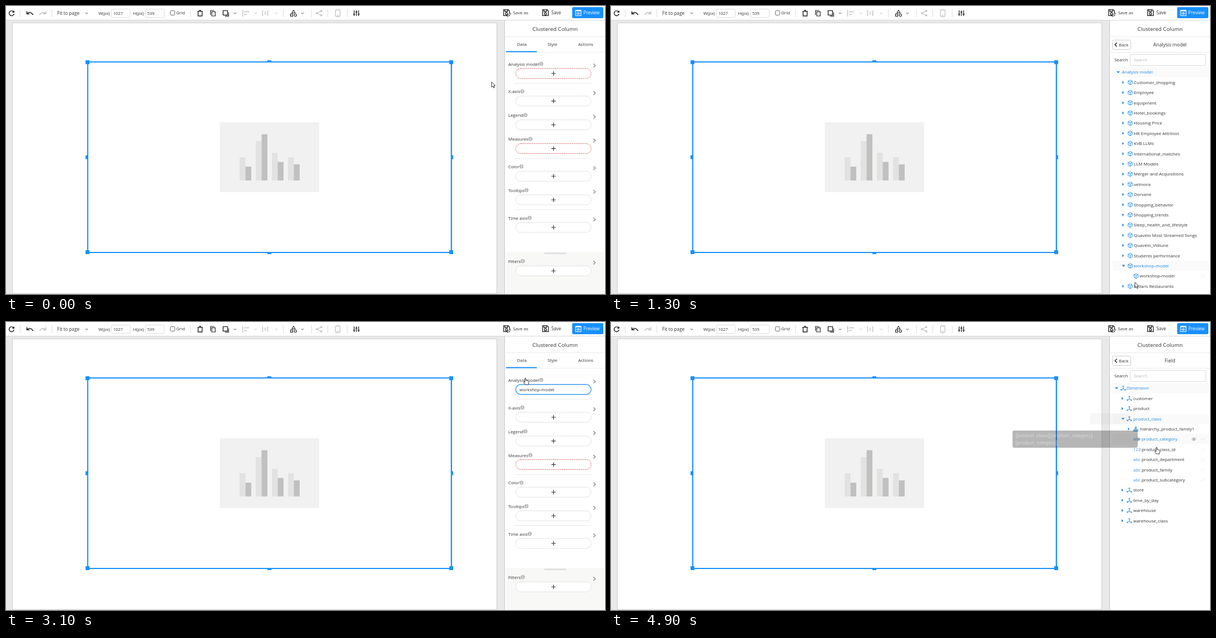
An HTML page with a canvas that plays this animation: 1077 by 520 pixels, repeating every 5 s.

```html
<!DOCTYPE html>
<html lang="en">
<head>
<meta charset="utf-8">
<title>Report designer</title>
<style>
html, body { margin: 0; width: 1077px; height: 520px; overflow: hidden; background: #fff; }
canvas { display: block; width: 1077px; height: 520px; }
</style>
</head>
<body>
<canvas id="stage" width="1077" height="520"></canvas>
<script>
const ctx = document.getElementById("stage").getContext("2d");
const UI = '"Open Sans", "Noto Sans", sans-serif';
const TIP = '"Liberation Sans", Arial, sans-serif';
const BLUE = "#1890ff", LINK = "#1c86dd", INK = "#333", PALE = "#bfbfbf";
const LOOP = 5000, STEP = 50;

const clamp = v => Math.max(0, Math.min(1, v));
const ramp = (t, a, b) => clamp((t - a) / (b - a));
const pulse = (t, a, b, c, d) => Math.min(ramp(t, a, b), 1 - ramp(t, c, d));

// Fonts are laid out ten times larger so that small sizes keep exact spacing.
function setFont(size, family, weight) {
  ctx.font = `${weight} ${size * 10}px ${family}`;
}
function textWidth(s, size = 7.95, family = UI, weight = 400) {
  setFont(size, family, weight);
  return ctx.measureText(s).width / 10;
}
function text(s, x, y, color = INK, size = 7.95, align = "left", family = UI, weight = 400) {
  ctx.save();
  ctx.translate(x, y + size * 0.36);
  ctx.scale(0.1, 0.1);
  setFont(size, family, weight);
  ctx.textAlign = align;
  ctx.fillStyle = color;
  ctx.fillText(s, 0, 0);
  ctx.restore();
}
function rect(x, y, w, h, color) {
  ctx.fillStyle = color;
  ctx.fillRect(x, y, w, h);
}
function box(x, y, w, h, r, fill, line, width = 1, dash = []) {
  ctx.beginPath();
  ctx.roundRect(x, y, w, h, r);
  if (fill) { ctx.fillStyle = fill; ctx.fill(); }
  if (line) {
    ctx.strokeStyle = line;
    ctx.lineWidth = width;
    ctx.setLineDash(dash);
    ctx.stroke();
    ctx.setLineDash([]);
  }
}
function icon(d, x, y, line, width = 1, fill) {
  const p = new Path2D(d);
  ctx.save();
  ctx.translate(x, y);
  ctx.lineJoin = "round";
  if (fill) { ctx.fillStyle = fill; ctx.fill(p); }
  if (line) { ctx.strokeStyle = line; ctx.lineWidth = width; ctx.stroke(p); }
  ctx.restore();
}
function dot(x, y, r, color) {
  ctx.beginPath();
  ctx.arc(x, y, r, 0, 7);
  ctx.fillStyle = color;
  ctx.fill();
}

const CHECK = "M-3.6 0L-1.2 2.4L3.8 -2.4";
const DOWN = "M-2.2 -1L0 1.2L2.2 -1";
const RELOAD = "M3.6 -2.6A4.4 4.4 0 1 0 4.4 1M4.4 -4.6V-1.6H1.4";
const CUBE = "M0 -4.2L3.7 -2.3V2.2L0 4.2L-3.7 2.2V-2.3ZM-3.7 -2.3L0 -.4L3.7 -2.3M0 -.4V4.2";
const AXES = "M0 1V-4M-1.4 -2.7L0 -4.3L1.4 -2.7M0 1L-4 3.4M-4.2 1.6V3.6H-2.2M0 1L4 3.4M4.2 1.6V3.6H2.2";
const TREE = "M0 -1V1M-3 2V.2H3V2M0 0V2M-1.2 -4H1.2V-1.6H-1.2ZM-4.2 2H-1.9V4.2H-4.2ZM-1.1 2H1.1V4.2H-1.1ZM1.9 2H4.2V4.2H1.9Z";
const DISK = "M-5.3 -5.3H3L5.3 -3V5.3H-5.3ZM-3 -5V-2H2V-5M-2 2A2 2 0 1 0 2 2A2 2 0 1 0 -2 2";
const ARROW = "M0 0V9.6L2.2 7.5L3.8 10.9L5.4 10.2L3.9 6.9H6.8Z";
const HAND = "M-1 1Q0 -.6 1 1V4.6L2.4 4.6L3.8 5L5.2 5.6Q6.2 6.1 6 8L5 12.2H0L-3 8.6Q-3.7 7 -2.2 6.9L-1 8Z";

function field(label, value, lx, x, w) {
  text(label, lx, 13);
  box(x + .5, 5.5, w, 15, 2, "#fff", "#ddd");
  text(value, x + 4, 13, INK, 7.5);
}

function toolbar() {
  rect(0, 0, 1077, 25, "#fff");
  rect(0, 25, 1077, 1, "#d6d6d6");
  for (const x of [25, 82, 331, 498, 549, 578, 613]) rect(x, 6, 1, 14, "#ddd");
  icon(RELOAD, 10, 13, "#222", 1.4);
  const undo = "M-5.5 -3.5V1.2H-.8M-5 .8Q0 -4.8 5.8 3";
  icon(undo, 43, 13, "#222", 1.6);
  icon("M5.5 -3.5V1.2H.8M5 .8Q0 -4.8 -5.8 3", 66, 13, PALE, 1.5);
  text("Fit to page", 92, 13, INK, 8.2);
  icon(DOWN, 145, 13, "#444");
  field("W(px)", "1027", 166, 189, 34);
  field("H(px)", "539", 228.5, 250, 34);
  box(295.5, 8.5, 8, 8, 2, "#fff", "#666");
  text("Grid", 306, 12.5);
  icon("M-3.6 -3V5H3.6V-3M-4.8 -3.4H4.8M-2 -5H2", 349, 13, "#222", 1.4);
  icon("M-2 -2.6H4.2V5H-2ZM-4.3 3V-5H2.4", 372, 13, "#222", 1.2);
  icon("M-4.6 -4.6H3.4V3.4H-4.6Z", 395, 13, "#222", 1.4);
  icon("M5.4 -1.5V5.4H-1.5", 395, 13, "#222", 1.1);
  icon(DOWN, 412, 13, "#444");
  icon("M-5.5 -6V6M-3 -2.5H6M-3 2.5H2", 431, 13, PALE, 1.4);
  icon(DOWN, 449, 13, PALE);
  icon("M-4.6 -5V5M4.6 -5V5M0 -3V3", 466, 13, PALE, 1.4);
  icon(DOWN, 486, 13, PALE);
  icon("M0 -5.5L3 -.5H-3ZM-5.4 1.4H-1.4V5.4H-5.4ZM1.2 3.4A2.1 2.1 0 1 0 5.4 3.4A2.1 2.1 0 1 0 1.2 3.4", 517, 13, "#222", 1.1);
  icon(DOWN, 533, 13, "#444");
  icon("M4 -4L-4 0L4 4", 563, 13, PALE, 1.1);
  dot(567, 9, 1.8, PALE); dot(559, 13, 1.8, PALE); dot(567, 17, 1.8, PALE);
  box(592.5, 7, 8, 12, 1.5, null, PALE, 1.3);
  rect(595, 16, 3, 1, PALE);
  icon("M-4 -5V5M0 -5V5M4 -5V5M-5.8 1.8H-2.2M-1.8 -1.8H1.8M2.2 1.8H5.8", 630, 13, "#222", 1.3);
  icon(DISK, 900, 12, "#222", 1.3);
  icon("M0 6L5.6 .6L7 2L1.6 7H0Z", 901, 12, "#222", .8, "#fff");
  text("Save as", 911.5, 12.5);
  icon(DISK, 970, 12, "#222", 1.3);
  text("Save", 980.5, 12.5, INK, 8.1);
  box(1018, 2, 56, 20, 2, BLUE);
  box(1024, 7.5, 10, 10, 1, null, "#fff", 1.1);
  rect(1024, 7.5, 10, 2, "#fff");
  icon("M-3.3 1Q0 -2.6 3.3 1Q0 4.4 -3.3 1", 1029, 12.5, "#fff", .9);
  dot(1029, 13.5, 1, "#fff");
  text("Preview", 1038, 12.5, "#fff", 8.1);
}

function canvasArea() {
  rect(0, 26, 897, 494, "#e9e9e9");
  box(11.5, 30.5, 871, 488.5, 0, "#fff", "#cfcfcf");
  rect(384.5, 210, 178.5, 126, "#f1f1f1");
  [[273, 290], [244, 231.5], [265, 281.5], [273, 286]].forEach(([a, b], i) => {
    const x = 420 + 29 * i;
    rect(x, a, 10.5, 315 - a, "#e2e2e1");
    rect(x + 10.5, b, 10.5, 315 - b, "#c0c0c0");
  });
  rect(146, 100, 656, 2, BLUE);
  rect(146, 444, 656, 2, BLUE);
  rect(146, 100, 2, 346, BLUE);
  rect(799.7, 100, 2.3, 346, BLUE);
  for (const x of [143, 797]) for (const y of [98, 441]) rect(x, y, 7, 7, BLUE);
  rect(470, 98, 7, 4, BLUE);
  rect(470, 444, 7, 4, BLUE);
  rect(143, 269.5, 4, 7, BLUE);
  rect(800, 269.5, 4, 7, BLUE);
}

function section(label, y, pillY, style, value) {
  text(label, 903, y);
  const ix = 903 + textWidth(label) + 3.8;
  dot(ix, y - .5, 3.7, "#bdbdbd");
  rect(ix - .5, y - 1, 1, 2.6, "#fff");
  rect(ix - .5, y - 2.8, 1, 1, "#fff");
  icon("M-1.8 -3.2L1.6 0L-1.8 3.2", 1058, y + 2.5, "#999", 1.7);
  const line = { need: "#cc4444", set: "#3b9af0", hover: BLUE }[style] || "#c9c9c9";
  const solid = style === "set";
  box(916.5, pillY - 9, 135.5, 18, 9, "#fff", line, solid ? 1.5 : .9, solid ? [] : [2, 1.4]);
  if (value) text(value, 923, pillY);
  else icon("M-4 0H4M0 -4V4", 984.5, pillY, "#333", 1.1);
}

function dataPanel(t) {
  const filled = t >= 2800, s = filled ? .4 : 0;
  const hoverX = t >= 3300 && t < 4050;
  text("Data", 927.5, 69, INK, 7.9, "center");
  text("Style", 982.5, 69, INK, 7.95, "center");
  text("Actions", 1042.3, 69, INK, 7.95, "center");
  rect(898, 83, 179, 1, "#eee");
  rect(899, 81.4, 55.5, 2, BLUE);
  section("Analysis model", 105, 121.8, filled ? "set" : t >= 450 ? "hover" : "need", filled && "workshop-model");
  section("X-axis", 154.6 + s, 171.6 + s, hoverX ? "hover" : "");
  section("Legend", 197.5 + s, 214.5 + s);
  section("Measures", 240.4 + s, 257.4, "need");
  section("Color", 290.2 + s, 307.3);
  section("Tooltips", 333, 350);
  section("Time axis", 383, 399.8);
  for (const y of [139, 275, 367]) rect(914, y, 140, 1, "#ebebeb");
  rect(899, 444, 177, 76, "#f8f8f7");
  rect(968, 445.5, 39, 2.5, "#dedede");
  section("Filters", 461, 478.2);
}

const rowY = i => 119.5 + 18.4 * i;
const band = i => rect(902, rowY(i) - 9, 173, 18, "#fafafa");
function expander(x, y, open) {
  icon(open ? "M-3 -1.5H3L0 1.8Z" : "M-1.4 -2.7L1.7 0L-1.4 2.7Z", x, y, null, 0, LINK);
}

function listHeader(title) {
  box(901.5, 61.5, 33, 17, 3, "#fff", "#ccc");
  icon("M1.6 -3.6L-1.8 0L1.6 3.6", 908, 70, "#222", 1.4);
  text("Back", 913, 70);
  text(title, 1005, 70, INK, 8.6, "center");
  rect(898, 83, 179, 1, "#eaeaea");
  text("Search", 905, 97, INK, 7.8);
  box(933.5, 87.5, 136, 20, 2, "#fff", "#d9d9d9");
  text("Search", 940, 97.5, "#b5b5b5", 7.7);
}

const MODELS = ["Customer_shopping", "Employee", "equipment", "Hotel_bookings", "Housing Price",
  "HR Employee Attrition", "KVB LLMs", "International_matches", "LLM Models",
  "Merger and Acquisitions", "velmora", "Dorvane", "Shopping_behavior", "Shopping_trends",
  "Sleep_health_and_lifestyle", "Quavelo Most Streamed Songs", "Quavelo_Vidlune",
  "Students performance", "workshop-model", ">workshop-model", "Pellaro Restaurants"];

function modelPanel(t) {
  const picked = t >= 1900;
  const hover = t >= 1250 && t < 1750 ? 19 : t >= 1750 && t < 2250 ? 20 : 0;
  listHeader("Analysis model");
  band(0);
  if (hover) band(hover);
  if (picked) { band(19); band(20); }
  expander(912, rowY(0), true);
  text("Analysis model", 918.5, rowY(0), LINK);
  if (t < 1150) icon("M4 -1.2A4 4 0 0 0 -3.6 -1.4M-4 1.2A4 4 0 0 0 3.6 1.4M-3.9 -4V-1.2H-1.2M3.9 4V1.2H1.2", 1064, rowY(0), "#3b9af0");
  MODELS.forEach((name, n) => {
    const i = n + 1, y = rowY(i), leaf = name[0] === ">", dx = leaf ? 10.5 : 0;
    if (!leaf) expander(dx + (i === 19 ? 921.5 : 920.8), y, i === 19);
    icon(CUBE, 933.5 + dx, y, LINK, .9);
    const on = i === hover || picked && (i === 19 || i === 20);
    text(leaf ? name.slice(1) : name, 940 + dx, y, on ? LINK : INK);
  });
  icon(CHECK, 1064.5, rowY(20), picked ? "#1677d8" : "#eee", picked ? 2 : 1);
  if (picked) {
    dot(936.5, 473.2, 3.4, "#2fae3f");
    icon("M-1.6 0L-.4 1.2L1.7 -1.1", 936.5, 473.2, "#fff", .9);
  }
}

const DIMENSIONS = ["customer", "product", "product_class", "store", "time_by_day", "warehouse", "warehouse_class"];
const FIELDS = ["abc product_category", "123 product_class_id", "abc product_department",
  "abc product_family", "abc product_subcategory"];

function fieldPanel(t) {
  const open = t >= 4200, hover = t >= 4700;
  listHeader("Field");
  band(0);
  band(3);
  if (hover) band(5);
  expander(909, rowY(0), true);
  icon(AXES, 921, rowY(0), LINK);
  text("Dimension", 927, rowY(0), LINK);
  DIMENSIONS.forEach((name, n) => {
    const y = rowY(n + 1 + (open && n > 2 ? 6 : 0)), mine = n === 2;
    expander(mine && open ? 920.5 : 919.5, y, mine && open);
    icon(AXES, 932, y, LINK);
    text(name, 939, y, mine ? LINK : INK);
  });
  if (!open) return;
  expander(931, rowY(4), false);
  icon(TREE, 943.5, rowY(4), LINK, .9);
  text("hierarchy_product_family1", 951, rowY(4));
  FIELDS.forEach((f, n) => {
    const y = rowY(5 + n), [kind, name] = f.split(" "), on = hover && !n;
    text(kind, 939, y, "#3b8fe0");
    text(name, 954, y, on ? LINK : INK);
    icon(CHECK, 1064.5, y, on ? "#ddd" : "#eee");
    if (on) {
      icon("M-4 0Q0 -5 4 0Q0 5 -4 0", 1048, y, "#999", .9);
      dot(1048, y, 1.5, "#999");
    }
  });
}

function tooltip(lines, right, y, alpha) {
  if (alpha <= 0) return;
  const w = Math.max(...lines.map(s => textWidth(s, 8.2, TIP, 700))) + 11;
  // Two lines wrap inside the widest allowed box.
  const width = lines.length > 1 ? 225 : w, h = lines.length > 1 ? 31 : 20;
  const x = right - width;
  ctx.save();
  ctx.globalAlpha = alpha;
  ctx.beginPath();
  ctx.roundRect(x, y - h / 2, width, h, 3);
  ctx.moveTo(right, y - 4);
  ctx.lineTo(right + 5, y);
  ctx.lineTo(right, y + 4);
  ctx.fillStyle = "#333";
  ctx.fill();
  lines.forEach((s, i) =>
    text(s, x + 5.5, y + (i - (lines.length - 1) / 2) * 12.4, "#fff", 8.2, "left", TIP, 700));
  ctx.restore();
}

function tooltips(t) {
  tooltip(["Add data"], 909, 122, .95 * pulse(t, 500, 600, 900, 1150));
  tooltip(["[Analysis model]"], 912, 119.5, pulse(t, 855, 980, 1100, 1200));
  tooltip(["[workshop-model]"], 945, 487.5, pulse(t, 1750, 1850, 1950, 2080));
  tooltip(["Add data"], 909, 172, pulse(t, 3330, 3430, 4050, 4260));
  tooltip(["[product_class]"], 933, 174.8, pulse(t, 4080, 4220, 4700, 4908));
  tooltip(["[product_class].[product_category].", "[product_category]"], 947, 211.5, ramp(t, 4800, 5080));
}

// time, x, y of the pointer tip
const PATH = [[0, 873, 137], [50, 873, 137], [450, 983, 119], [850, 983, 119], [950, 947, 125],
  [1100, 946, 130], [1300, 942, 499], [1650, 942, 499], [1800, 972, 484], [2000, 970, 484],
  [2100, 964, 450], [2200, 950, 270], [2500, 914, 67], [2800, 914, 67], [3100, 934, 101],
  [3300, 982, 168], [4050, 982, 168], [4250, 967, 176], [4450, 967, 177], [4900, 981, 226], [5000, 981, 226]];

function pointer(t) {
  const i = PATH.findIndex(p => p[0] > t), [a, ax, ay] = PATH[i - 1], [b, bx, by] = PATH[i];
  const k = ramp(t, a, b);
  const arrow = t < 400 || t >= 1150 && t < 1750;
  icon(arrow ? ARROW : HAND, ax + (bx - ax) * k, ay + (by - ay) * k, "#222", .9, "#fff");
}

function draw(t) {
  toolbar();
  canvasArea();
  rect(897, 26, 180, 494, "#fff");
  rect(896, 26, 1, 494, "#c8c8c8");
  text("Clustered Column", 987.3, 41, INK, 9.75, "center");
  rect(898, 55, 179, 1, "#eaeaea");
  if (t < 850 || t >= 2800 && t < 4050) dataPanel(t);
  else if (t < 2800) modelPanel(t);
  else fieldPanel(t);
  tooltips(t);
  pointer(t);
}

function frame() {
  const t = performance.now() % LOOP;
  draw(Math.floor(t / STEP) * STEP);
  requestAnimationFrame(frame);
}
frame();
</script>
</body>
</html>
```
